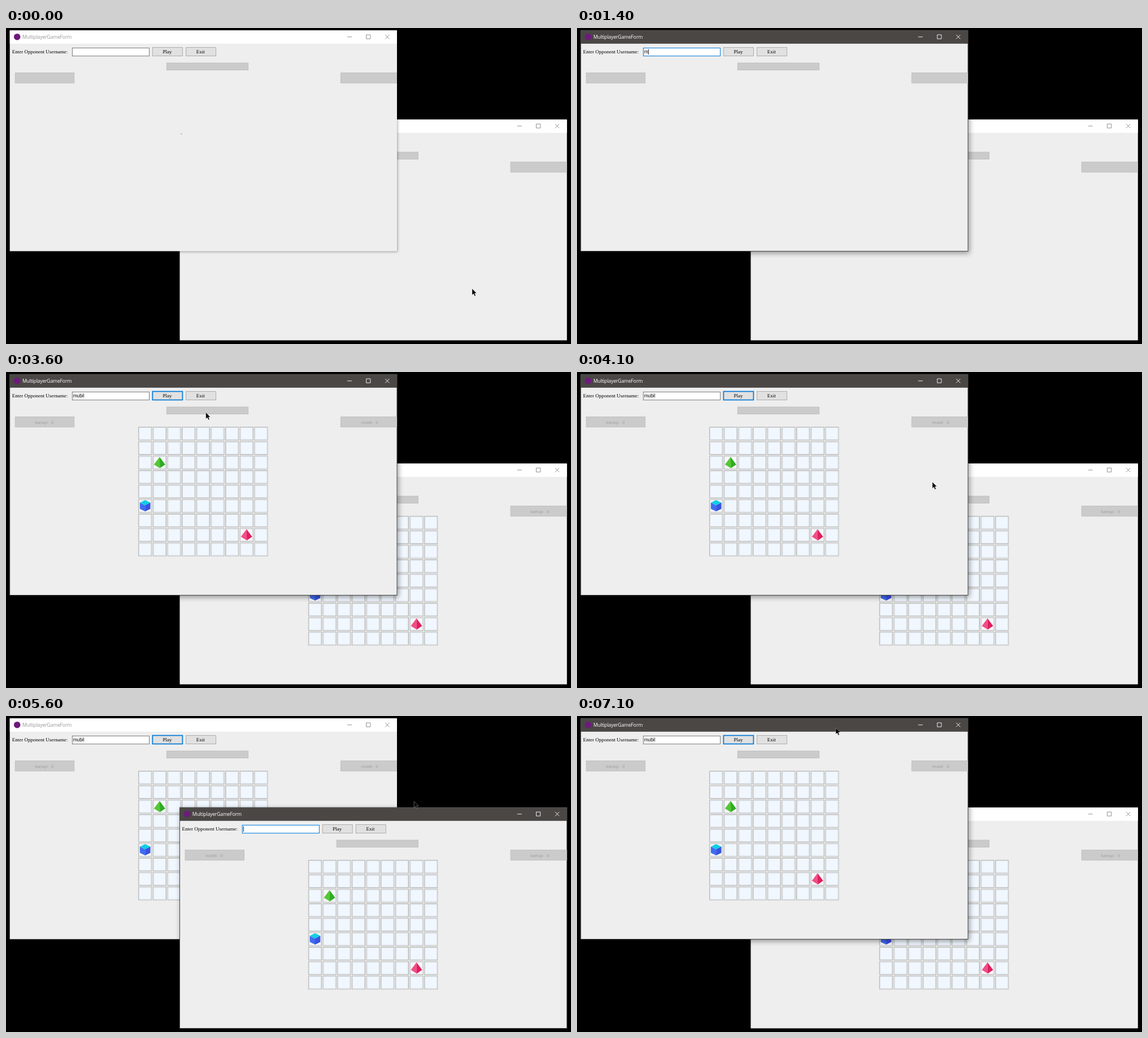
Recreate the animation shown at these times as an HTML page. Size 1000 by 560 pixels, loop 7200 ms.

```html
<!DOCTYPE html>
<html lang="en">
<head>
<meta charset="utf-8">
<title>Multiplayer game</title>
<style>
  html, body { margin: 0; width: 100%; height: 100%; overflow: hidden; background: #000; }
  svg { display: block; width: 1000px; height: 560px; }
  text { white-space: pre; }
  .title { font: 8.7px "Open Sans", sans-serif; letter-spacing: -.22px; }
  .serif { font: 9px "Liberation Serif", serif; fill: #000; }
  .sans { font: 8.3px "Liberation Sans", sans-serif; fill: #000; }
  .score { font: 8.1px "Liberation Sans", sans-serif; fill: #a0a0a0; }
  .mid { text-anchor: middle; }
</style>
</head>
<body>
<svg id="stage" viewBox="0 0 1000 560"></svg>
<script>
const LOOP = 7200, STEP = 100;
const HOST = "kanup", GUEST = "mubil";
const BLUE = "#0078d7";
const stage = document.getElementById("stage");

function add(parent, tag, attrs, text) {
  const node = document.createElementNS("http://www.w3.org/2000/svg", tag);
  set(node, attrs);
  if (text) node.textContent = text;
  return parent.appendChild(node);
}
function set(node, attrs) {
  for (const key in attrs) node.setAttribute(key, attrs[key]);
}
const show = (node, on) => set(node, { visibility: on ? "visible" : "hidden" });
const box = (parent, x, y, width, height, fill, stroke = "none") =>
  add(parent, "rect", { x, y, width, height, fill, stroke });
const face = (parent, points, fill) => add(parent, "polygon", { points, fill });
const label = (parent, x, y, cls, text) => add(parent, "text", { x, y, class: cls }, text);

function pyramid(parent, x, y, light, dark) {
  const g = add(parent, "g", { transform: `translate(${x} ${y})` });
  face(g, "0,-10 -10,3.5 .5,10", light);
  face(g, "0,-10 .5,10 10,3.5", dark);
  add(g, "path", { d: "M-1.5 -6V8M-4 -3V6.5M-6.5 0V5", stroke: dark, "stroke-width": .7, opacity: .5 });
}

function cube(parent, x, y) {
  const g = add(parent, "g", { transform: `translate(${x} ${y})` });
  face(g, "0,-10 9.3,-5.5 0,-.5 -9.3,-5.5", "#10cfe4");
  face(g, "-9.3,-5.5 0,-.5 0,10 -9.3,5.5", "#3f6cf0");
  face(g, "9.3,-5.5 0,-.5 0,10 9.3,5.5", "#3048dc");
  add(g, "path", { d: "M0 2L9.3 -3M0 4.5L9.3 -.5M0 7L9.3 2", stroke: "#5b86f6", "stroke-width": .7, opacity: .7 });
}

function makeBoard(parent) {
  const g = add(parent, "g");
  const pitch = 25.65, size = 23.2, taken = ["1,2", "0,5", "7,7"];
  for (let row = 0; row < 9; row++) {
    for (let col = 0; col < 9; col++) {
      const x = 234.6 + col * pitch, y = 97.6 + row * pitch;
      box(g, x, y, size, size, taken.includes(col + "," + row) ? "#f6f8fb" : "#f0f7ff", "#b4b4b4");
      box(g, x + 1, y + 1, size - 2, size - 2, "none", "#dadcde");
    }
  }
  pyramid(g, 271.8, 160.5, "#5bcb3c", "#2fac22");
  cube(g, 246.2, 237);
  pyramid(g, 425.7, 288.5, "#f4568f", "#df1f5f");
  return g;
}

function makeWindow(dx, dy, left, right) {
  const g = add(stage, "g", { transform: `translate(${dx} ${dy})` });
  const frame = box(g, 6.7, 4.2, 685.3, 391.3, "#eee");
  const bar = box(g, 6.7, 4.2, 685.3, 23.6, "#fff");
  add(g, "circle", { cx: 19.7, cy: 15.7, r: 5.8, fill: "#6d1a7c" });
  const title = label(g, 29, 19, "title", "MultiplayerGameForm");
  const controls = add(g, "path", {
    d: "M604 15.8h8M637.7 12h7.2v7.2h-7.2zM671.2 12l7.2 7.4M678.4 12l-7.2 7.4",
    fill: "none", "stroke-width": .9
  });
  label(g, 10.7, 45.3, "serif", "Enter Opponent Username:");
  const input = box(g, 117.4, 35.4, 136.2, 14.2, "#fff");
  const typed = label(g, 118.7, 45.3, "sans");
  const caret = box(g, 0, 37.5, .9, 9.5, "#000");
  const play = box(g, 259.4, 34.5, 53, 15);
  box(g, 318.5, 34.5, 53, 15, "#e1e1e1", "#adadad");
  label(g, 285.4, 45.3, "serif mid", "Play");
  label(g, 344.2, 45.3, "serif mid", "Exit");
  box(g, 284.4, 62, 144.2, 12.4, "#cbcbcb", "#c0c0c0");
  box(g, 16.3, 79.4, 104.4, 18.2, "#cbcbcb", "#c0c0c0");
  add(g, "path", { d: "M692 79.4H592.4V97.6H692", fill: "#cbcbcb", stroke: "#c0c0c0" });

  const game = add(g, "g");
  label(game, 67.8, 91.5, "score mid", left + ":  0");
  label(game, 643.5, 91.5, "score mid", right + ":  0");
  makeBoard(game);

  return {
    g,
    update(s) {
      set(frame, {
        stroke: s.active ? "#484848" : "none",
        style: "filter:drop-shadow(" +
          (s.active ? "2px 3px 5px rgba(0,0,0,.4)" : "1px 1px 2px rgba(0,0,0,.35)") + ")"
      });
      set(bar, { fill: s.active ? "#4a4745" : "#fff" });
      set(title, { fill: s.active ? "#fff" : "#999" });
      set(controls, { stroke: s.active ? "#fff" : "#858585" });
      set(input, { stroke: s.focus ? BLUE : "#7a7a7a" });
      typed.textContent = s.text;
      show(caret, s.caret);
      if (s.caret) set(caret, { x: 119 + (s.text ? typed.getComputedTextLength() : 0) });
      set(play, {
        fill: s.press ? "#cce4f7" : s.hover ? "#e5f1fb" : "#e1e1e1",
        stroke: s.chosen || s.hover ? BLUE : "#adadad",
        "stroke-width": s.chosen ? 1.7 : 1
      });
      show(game, s.board);
    }
  };
}

const back = makeWindow(300.8, 158, GUEST, HOST);
const front = makeWindow(0, 0, HOST, GUEST);
const speck = box(front.g, 309.5, 187, 1.6, 1, "#555");
const cursor = add(stage, "path", {
  d: "M0 0V11.2L2.6 8.8L4.4 13L6.3 12.2L4.5 8.1H7.8Z",
  fill: "#000", stroke: "#fff", "stroke-width": .35
});

// time, x, y
const PATH = [
  [0, 825, 462], [600, 290, 16], [800, 290, 16], [1100, 262, 51], [2400, 262, 51],
  [2600, 266, 61], [2800, 262, 47], [3200, 285, 41], [3500, 285, 41], [4000, 629, 195],
  [4100, 629, 195], [4500, 760, 170], [5500, 760, 170], [6300, 457, 20], [6400, 458, 21], [7200, 458, 21]
];
const KEYS = [1400, 1500, 1800, 2000, 2100];
const within = (t, ...spans) => spans.some(([a, b]) => t >= a && t < b);

function pointer(t) {
  const i = PATH.findIndex(p => p[0] > t);
  const [t0, x0, y0] = PATH[i - 1], [t1, x1, y1] = PATH[i];
  const k = (t - t0) / (t1 - t0);
  return [x0 + (x1 - x0) * k, y0 + (y1 - y0) * k];
}

function draw(t) {
  const [x, y] = pointer(t);
  const visible = !within(t, [1400, 2500]);
  const backOn = within(t, [4700, 6700]);
  const board = t >= 3500;

  front.update({
    active: t >= 600 && !backOn,
    focus: within(t, [600, 3300]),
    text: GUEST.slice(0, KEYS.filter(k => k <= t).length),
    caret: within(t, [600, 1100], [1400, 2600], [3100, 3300]),
    hover: visible && x > 259 && x < 313 && y > 34 && y < 50,
    press: t === 3300,
    chosen: t >= 3300,
    board
  });
  back.update({
    active: backOn,
    focus: within(t, [4800, 6700]),
    text: "",
    caret: within(t, [4800, 5100], [5600, 6100], [6600, 6700]),
    board
  });

  const top = backOn ? back.g : front.g;
  if (cursor.previousSibling !== top) stage.insertBefore(top, cursor);
  show(speck, t < 600);
  show(cursor, visible);
  set(cursor, { transform: `translate(${x} ${y})` });
}

const start = performance.now();
let last = -1;
function tick() {
  const t = Math.floor((performance.now() - start) % LOOP / STEP) * STEP;
  if (t !== last) draw(last = t);
  requestAnimationFrame(tick);
}
tick();
</script>
</body>
</html>
```
